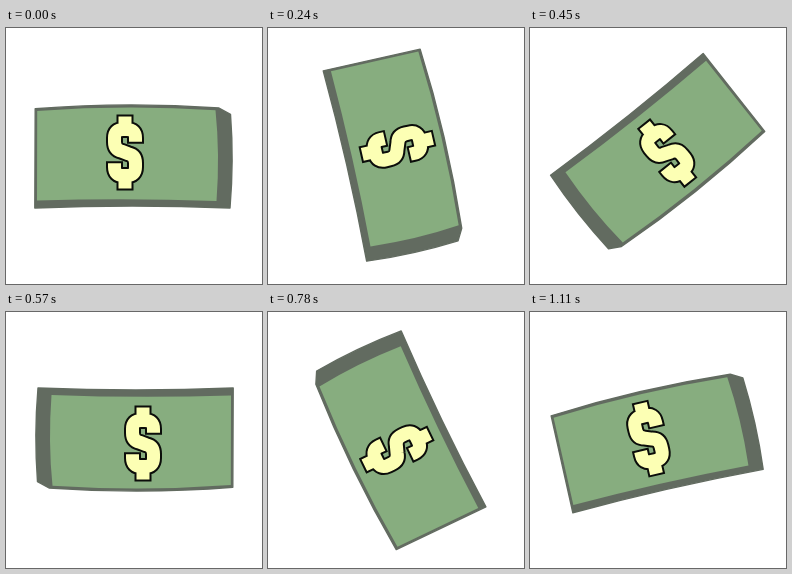
These frames come from a looping animation (256 px wide and 256 px high, 1170 ms). An HTML page:

```html
<!DOCTYPE html>
<html lang="en">
<head>
<meta charset="utf-8">
<title>Spinning banknote</title>
<style>
  html, body { margin: 0; width: 100%; height: 100%; overflow: hidden; background: #fff; }
  svg { display: block; width: 100vw; height: 100vh; }
  .side { fill: #626b60; stroke: #626b60; stroke-width: 1.4; stroke-linejoin: round; }
  .face { fill: #87ad7f; }
  .sign path { fill: none; stroke-linejoin: round; }
</style>
</head>
<body>
<svg viewBox="0 0 256 256">
  <g id="note">
    <path class="side" d="M29.2 80.7 Q120 73.5 213 80 L224.5 86.4 Q228 133 224 180 Q126 176 28.8 180 Z"/>
    <path class="face" d="M31.2 83 Q120 76.5 209.5 82.3 Q214 126 210.5 173 Q120 169.5 31 172.6 Z"/>
    <g class="sign" id="sign"></g>
  </g>
</svg>
<script>
  const LOOP = 1170, POSES = 28, TICK = 30;
  const note = document.getElementById('note');
  const sign = document.getElementById('sign');

  // Dollar strokes, with every open end lengthened by `e`
  const dollar = e =>
    `M129.5 ${113.7 + e} V110 Q129.5 101.5 121 101.5 H117 Q108.5 101.5 108.5 110 V114 ` +
    `Q108.5 121.5 115.5 123.2 L122.5 125.8 Q129.5 127.5 129.5 135 V139 ` +
    `Q129.5 147.5 121 147.5 H117 Q108.5 147.5 108.5 139 V${135.3 - e} ` +
    `M119 ${88.5 - e} V101 M119 148 V${160.5 + e}`;

  function stroke(color, width, extra) {
    const p = document.createElementNS('http://www.w3.org/2000/svg', 'path');
    p.setAttribute('d', dollar(extra));
    p.setAttribute('stroke', color);
    p.setAttribute('stroke-width', width);
    sign.append(p);
  }
  stroke('#0b0d0a', 17, 2);
  stroke('#fcffb4', 13, 0);

  // Even turns, each starting on a 30 ms tick
  const starts = Array.from({ length: POSES }, (_, k) =>
    Math.floor(k * LOOP / TICK / POSES + 0.32) * TICK);

  function draw(now) {
    const t = now % LOOP;
    const pose = starts.filter(s => s <= t).length - 1;
    note.setAttribute('transform', `rotate(${pose * 360 / POSES} 128 128)`);
  }

  const origin = performance.now();
  function loop() {
    draw(performance.now() - origin);
    requestAnimationFrame(loop);
  }
  loop();
</script>
</body>
</html>
```
